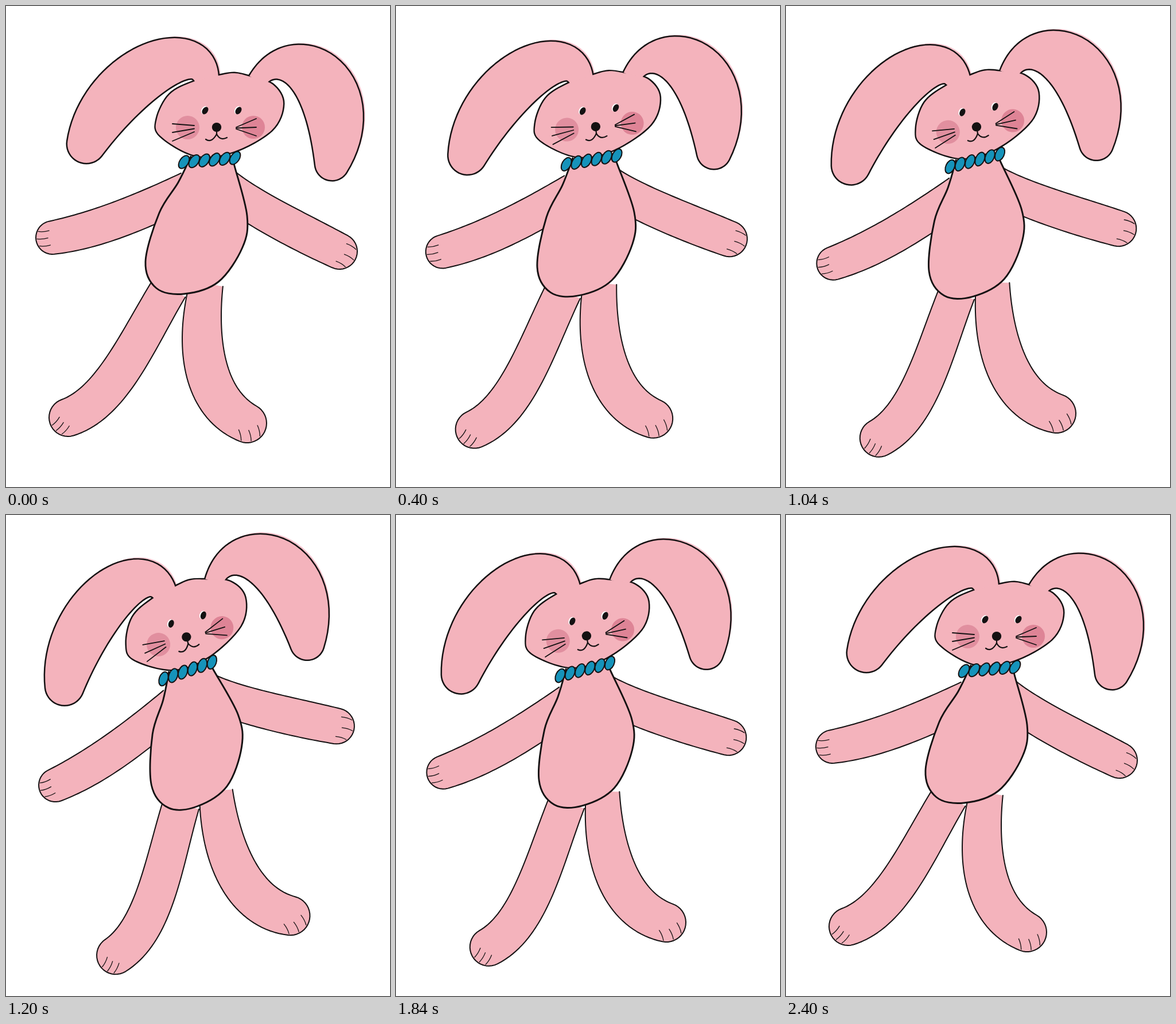
Write an HTML page with a canvas that moves like this. It is 669x837 px and loops after 2.8 s.

```html
<!DOCTYPE html>
<html lang="en">
<head>
<meta charset="utf-8">
<title>Swaying rabbit</title>
<style>
  html, body { margin: 0; width: 100%; height: 100%; overflow: hidden; background: #fff; }
  canvas { display: block; }
</style>
</head>
<body>
<canvas id="stage" width="669" height="837"></canvas>
<script>
const ctx = document.getElementById('stage').getContext('2d');
const INK = '#141112', PINK = '#f4b3bc', SPILL = '#f9c3cd', BLUE = '#1693ba';
const PIVOT = { x: 345.6, y: 417 };
const TILTS = [0, 5.3, 9.7, 14.6];
const STEP = 400;
const rad = deg => deg * Math.PI / 180;

const cubic = (a, b, c, d, t) => {
  const u = 1 - t;
  return u * u * u * a + 3 * u * u * t * b + 3 * u * t * t * c + t * t * t * d;
};
const slope = (a, b, c, d, t) => {
  const u = 1 - t;
  return 3 * (u * u * (b - a) + 2 * u * t * (c - b) + t * t * (d - c));
};

// Outline of a disc that slides along a Bezier spine while its radius follows
// a Bezier too: up one side, round the far end, back down the other side.
function tube(xs, ys, radii) {
  const near = [], far = [], cap = [], steps = 40;
  for (let i = 0; i <= steps; i++) {
    const t = i / steps;
    const dx = slope(...xs, t), dy = slope(...ys, t);
    const x = cubic(...xs, t), y = cubic(...ys, t), r = cubic(...radii, t);
    const heading = Math.atan2(dy, dx);
    const spread = Math.acos(-slope(...radii, t) / Math.hypot(dx, dy));
    const rim = a => [x + r * Math.cos(heading + a), y + r * Math.sin(heading + a)];
    near.push(rim(-spread));
    far.unshift(rim(spread));
    if (i === steps) {
      for (let k = 1; k < 20; k++) cap.push(rim(spread * (k / 10 - 1)));
    }
  }
  const path = new Path2D();
  [...near, ...cap, ...far].forEach(p => path.lineTo(...p));
  return path;
}

// Smooth curve through a few key points.
function curve(pts, closed) {
  const n = pts.length, path = new Path2D();
  const at = i => pts[closed ? (i + n) % n : Math.max(0, Math.min(n - 1, i))];
  path.moveTo(...pts[0]);
  for (let i = 0; i < n - (closed ? 0 : 1); i++) {
    const [a, b, c, d] = [at(i - 1), at(i), at(i + 1), at(i + 2)];
    path.bezierCurveTo(
      b[0] + (c[0] - a[0]) / 6, b[1] + (c[1] - a[1]) / 6,
      c[0] - (d[0] - b[0]) / 6, c[1] - (d[1] - b[1]) / 6, ...c);
  }
  return path;
}

const limb = (xs, ys, radii, toe, fan) =>
  ({ path: tube(xs, ys, radii), x: xs[3], y: ys[3], r: radii[3] * .93, toe: rad(toe), fan: rad(fan) });

const limbs = [
  limb([318, 235, 160, 81], [319, 358, 390, 403], [31, 31, 33, 29], 175, 28),
  limb([382, 430, 510, 581], [314, 352, 392, 427], [31, 31, 34, 31], 31, 38),
  limb([285, 230, 185, 108], [490, 580, 690, 716], [32, 33, 35, 33], 132, 22),
  limb([349, 330, 345, 420], [485, 590, 690, 726], [29, 37, 40, 34], 77, 32)
];
const ears = [
  tube([349, 330, 190, 140], [124, 48, 120, 240], [21, 35, 65, 33]),
  tube([438, 475, 605, 568], [130, 65, 106, 274], [16, 15, 86, 29])
];
const head = curve([[371,121], [398,117], [425,123], [465,137], [483,170], [463,216],
  [395,254], [330,260], [269,226], [263,196], [285,154], [326,132]], true);
const body = curve([[322,262], [300,307], [267,360], [243,445], [262,491], [310,501],
  [370,480], [412,420], [420,365], [398,278], [394,262]]);

function line(path, width) {
  ctx.lineWidth = width;
  ctx.strokeStyle = INK;
  ctx.stroke(path);
}

function fill(path, color = PINK) {
  ctx.fillStyle = color;
  ctx.fill(path);
}

function stroke(x1, y1, x2, y2, width, bendX = (x1 + x2) / 2, bendY = (y1 + y2) / 2) {
  const path = new Path2D();
  path.moveTo(x1, y1);
  path.quadraticCurveTo(bendX, bendY, x2, y2);
  line(path, width);
}

function oval(x, y, rx, ry, tilt, color, outline) {
  const path = new Path2D();
  path.ellipse(x, y, rx, ry, tilt, 0, Math.PI * 2);
  fill(path, color);
  if (outline) line(path, outline);
}

function drawLimb({ path, x, y, r, toe, fan }) {
  fill(path);
  line(path, 2);
  const dx = Math.cos(toe), dy = Math.sin(toe);
  for (let i = -1; i <= 1; i++) {
    const tx = x + r * Math.cos(toe + i * fan), ty = y + r * Math.sin(toe + i * fan);
    stroke(tx, ty, tx - 19 * dx, ty - 19 * dy, 1.3, tx - 9 * dx + 2 * dy, ty - 9 * dy - 2 * dx);
  }
}

function drawHead() {
  ctx.save();
  ctx.translate(4, -3);
  ears.forEach(p => fill(p, SPILL));
  ctx.restore();

  // Ink first, then fill, so the shapes merge into one outline.
  const parts = [...ears, head];
  parts.forEach(p => line(p, 5));
  parts.forEach(p => fill(p));

  oval(316.5, 211.5, 20.5, 20.5, 0, '#e18f9f');
  oval(431, 211, 20, 20, 0, '#de8496');
  for (let i = 0; i < 3; i++) {
    stroke(290, 205 + 15 * i, 328, 208 + 5.5 * i, 1.8);
    stroke(401, 211 + 1.5 * i, 436, 196 + 15 * i, 1.8);
  }
  for (const x of [347, 405]) {
    oval(x - 1.5, 181, 5, 7.2, .55, '#fff');
    oval(x, 182, 4.7, 7, .6, INK);
  }
  oval(367, 211, 8.2, 8, 0, INK);
  stroke(367, 214, 367, 223, 2.2);
  stroke(367, 223, 348, 232, 2.2, 358, 239);
  stroke(367, 223, 385, 229, 2.2, 373, 235);
}

function draw(now) {
  const pose = Math.floor(now / STEP) % 7;
  const tilt = TILTS[3 - Math.abs(pose - 3)];
  ctx.setTransform(1, 0, 0, 1, 0, 0);
  ctx.fillStyle = '#fff';
  ctx.fillRect(0, 0, 669, 837);
  ctx.translate(PIVOT.x, PIVOT.y);
  ctx.rotate(rad(-tilt));
  ctx.translate(-PIVOT.x, -PIVOT.y);
  ctx.lineCap = ctx.lineJoin = 'round';

  limbs.forEach(drawLimb);
  fill(body);
  line(body, 2.9);
  drawHead();
  for (let i = 0; i < 6; i++) {
    oval(310 + 17.8 * i, 271.5 - 1.4 * i, 7.5, 12.5, .6, BLUE, 2);
  }
  requestAnimationFrame(draw);
}
draw(performance.now());
</script>
</body>
</html>
```
